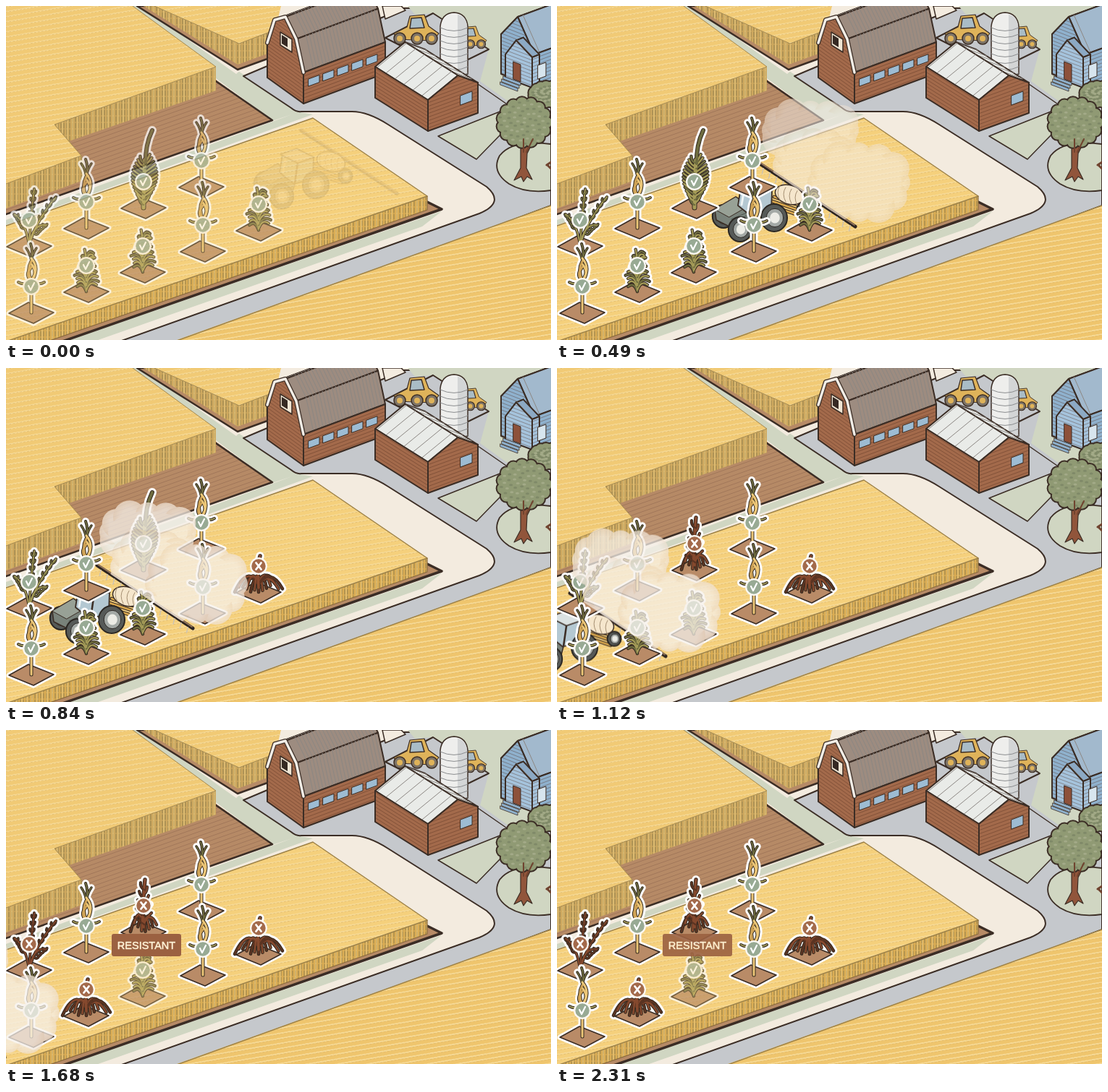
Write an HTML page with a canvas that moves like this. It is 753 by 462 pixels and loops after 2.38 s.

```html
<!DOCTYPE html>
<html lang="en">
<head>
<meta charset="utf-8">
<title>Field spraying</title>
<style>
html, body { margin: 0; width: 100%; height: 100%; overflow: hidden; background: #f3ebdf; }
canvas { display: block; }
</style>
</head>
<body>
<canvas id="stage" width="753" height="462"></canvas>
<script>
const W = 753, H = 462, STEP = 70, FRAMES = 34;
const INK = '#3b2d25', GREEN = '#d0d6c2', GRAY = '#c5c8cc', CREAM = '#f3ebdf';
const SOIL = '#b68a66', BRICK = '#a36a4b', GLASS = '#9dbcd3';
let g = document.getElementById('stage').getContext('2d');

const clamp = (v, a = 0, b = 1) => Math.min(b, Math.max(a, v));
function random(seed) {
  return () => (seed = seed * 16807 % 2147483647) / 2147483647;
}

function sprite(w, h, ox, oy, draw) {
  const c = document.createElement('canvas'), old = g;
  c.width = w; c.height = h;
  g = c.getContext('2d');
  g.translate(-ox, -oy);
  g.lineJoin = g.lineCap = 'round';
  draw();
  g = old;
  return c;
}

function paint(p, fill, line, w = 1.5) {
  if (fill) { g.fillStyle = fill; g.fill(p); }
  if (line) { g.strokeStyle = line; g.lineWidth = w; g.stroke(p); }
}
const path = (d, fill, line, w) => paint(new Path2D(d), fill, line, w);
const poly = (pts, fill, line, w) => path('M' + pts + 'Z', fill, line, w);
const line = (pts, color, w) => path('M' + pts, null, color, w);
function oval(x, y, rx, ry, fill, stroke, w, tilt = 0) {
  const p = new Path2D();
  p.ellipse(x, y, rx, ry, tilt, 0, 7);
  paint(p, fill, stroke, w);
}
const add = ([x, y], [u, v], k = 1) => [x + u * k, y + v * k];
// Parallelogram spanned by two vectors
const quad = (p, u, v) => [p, add(p, u), add(add(p, u), v), add(p, v)].join(' ');

// Polygon filled with parallel strokes; upright when slope is null
function hatch(pts, fill, color, slope, gap, w = 1, dash = []) {
  g.save();
  const p = new Path2D('M' + pts + 'Z');
  paint(p, fill);
  g.clip(p);
  g.setLineDash(dash);
  g.strokeStyle = color;
  g.lineWidth = w;
  g.beginPath();
  for (let k = -300; k < 1000; k += gap) {
    if (slope === null) { g.moveTo(k, 0); g.lineTo(k, H); }
    else { g.moveTo(0, k); g.lineTo(W, k + slope * W); }
  }
  g.stroke();
  g.restore();
}
function wheat(pts, fill = '#f1ca75') {
  hatch(pts, fill, '#f7db98', -.17, 7, 2, [3, 2]);
  hatch(pts, null, '#dcb567', -.17, 7.01, .7, [2, 3]);
}
function stalks(pts, fill = '#cfa95f') {
  hatch(pts, fill, '#8d7c4c', null, 4, 1, [7, 2]);
  hatch(pts, null, '#e7c67c', null, 7, 1.2);
}

function drawFields() {
  path('M0 0H753V462H0Z', CREAM);
  poly('172,0 186,0 330,96 402,146 424,150 0,303 0,285 368,158 290,100', GREEN);
  poly('196,0 330,84 318,94 186,0', CREAM);
  poly('0,288 368,159 395,150 0,296', CREAM);

  // Ploughed strip and the large field
  hatch('290,102 368,158 0,288 0,246 67,164', SOIL, '#a1775a', -.35, 6);
  line('290,104 368,158 0,288', INK, 2.5);
  stalks('67,164 290,84 290,117 84,188');
  stalks('0,246 104,207 115,238 0,280');
  const edge = '0,246 104,207 67,164 290,84 175,0';
  wheat('0,0 ' + edge);
  line(edge, '#a58a50', 1);

  // Field behind the barn
  poly('181,0 320,88 364,72 364,60 320,74 205,0', SOIL, INK, 2.5);
  stalks('190,0 205,0 322,52 372,32 372,62 320,81');
  wheat('205,0 380,0 372,33 322,52');
  line('205,0 322,52 372,33', '#a58a50', 1);

  // Field being sprayed
  poly('602,284 575,305 110,468 70,468', GREEN);
  poly('582,270 602,281 75,465 30,470', SOIL);
  line('582,271 602,281 75,465', INK, 3.5);
  stalks('582,263 582,282 40,470 0,470 0,462', '#dcae55');
  wheat('424,155 582,263 0,464 0,304', '#f5d07c');
  line('0,304 424,155 582,263 0,464', '#9c8148', 1.4);
  line('582,263 582,282 40,470', '#8a6a3c', 1.2);
}

function drawYard() {
  path('M328 97L550 3L753 3V276L240 470H140L654 287Q690 272 664 250L528 164Q500 146 478 146H408Q401 147 394 141Z', GRAY, INK, 2);
  wheat('753,276 753,462 236,462', '#efc56d');
  line('753,276 236,463', '#9c8148', 1.5);
  poly('520,0 546,0 552,6 524,18', CREAM, INK);
  poly('555,0 753,0 753,126 716,148 655,104 667,60 590,10 565,12', GREEN);
  poly('524,44 590,10 667,60 610,88', GRAY, INK, 2);
  line('652,108 714,151', INK);
  path('M597 180L690 143L712 160L684 177L650 212Z', GREEN, INK);
  path('M753 191Q700 184 682 207Q670 229 695 246Q718 260 753 255Z', GREEN, INK, 1.8);
}

function loader(x, y, s) {
  g.save();
  g.translate(x, y);
  g.scale(s, s);
  poly('-30,2 -12,-7 -8,-22 12,-24 18,-8 32,2 24,12 -26,10', '#dfb35a', INK, 1.2);
  poly('-6,-19 8,-20 12,-6 -8,-5', '#a9bcc6', INK);
  for (const k of [-22, 2, 22]) {
    oval(k, 9, 8, 8, '#7d7366', INK);
    oval(k, 9, 4, 4, '#dfb35a');
  }
  g.restore();
}

// Building from its near corner: a gable along `side`, swept along `depth`.
// Each profile entry is [share of side, height].
function building(corner, side, depth, profile, wall, roof, rib) {
  const top = profile.map(([t, h]) => add(add(corner, side, t), [0, -h]));
  for (let i = top.length - 2; i >= 0; i--) {
    const rise = [top[i + 1][0] - top[i][0], top[i + 1][1] - top[i][1]];
    poly(quad(top[i], rise, depth), roof, INK, 2);
    for (let k = .12; k < 1; k += rib) line([add(top[i], depth, k), add(top[i + 1], depth, k)].join(' '), '#8c8783', 1);
  }
  const face = [corner, ...top, add(corner, side)].join(' ');
  const flank = quad(corner, depth, [0, -profile[0][1]]);
  for (const [pts, v] of [[face, side], [flank, depth]]) {
    hatch(pts, wall, 'rgba(80,45,30,.4)', v[1] / v[0], 5);
    poly(pts, null, INK, 2);
  }
  return top;
}

function drawBuildings() {
  loader(566, 36, 1);
  loader(640, 46, .75);

  path('M600 28Q602 10 619 9Q636 10 638 28V94Q619 104 600 94Z', '#eeeeec', INK);
  path('M624 12Q636 14 637 28V94L624 98Z', '#d3d5d6');
  for (let y = 30; y < 95; y += 9) path(`M600 ${y}Q619 ${y + 9} 638 ${y}`, null, '#8b8d8f', 1);

  // Barn
  const gable = building([411, 135], [-50, -36], [113, -42],
    [[0, 43], [.2, 82], [.5, 102], [.8, 87], [1, 48]], BRICK, '#9d8c80', .04).join(' ');
  line(gable, INK, 6);
  line(gable, '#f2ede6', 3.5);
  poly(quad([379, 36], [16, 10], [0, 18]), '#f0e6d4', INK);
  poly(quad([381, 40], [8, 5], [0, 12]), '#352923');
  for (let i = 0; i < 5; i++) poly(quad([418 + i * 20, 101 - i * 7.2], [15, -5.5], [0, 10]), GLASS, INK, 1);

  // Shed
  building([583, 173], [69, -25], [-73, -46], [[0, 43], [.6, 62], [1, 42]], BRICK, '#e9ebe8', .17);
  poly(quad([628, 124], [16, -6], [0, 13]), GLASS, INK, 1);

  // House
  building([730, 112], [-46, -18], [60, -22], [[0, 45], [.5, 88], [1, 55]], '#8fb1cd', '#a2b9cd', 2);
  building([727, 113], [-37, -14], [10, -4], [[0, 42], [.6, 57], [1, 32]], '#a5c3dc', '#8ca9c4', 2);
  poly(quad([701, 77], [10, 4], [0, 24]), '#8d513a', INK, 1);
  poly(quad([735, 82], [11, -4], [0, 19]), '#d7e5ee', INK, 1);
  for (let i = 0; i < 3; i++) poly(quad([687 - i * 2, 97 + i * 4], [24, 9], [0, 4]), '#8fb1cd', INK, .8);
}

function crown(x, y, rx, ry) {
  const ring = 2 * Math.PI / 15;
  for (const [grow, color] of [[2, INK], [0, '#909a74']]) {
    for (let a = 0; a < 6.2; a += ring) oval(x + Math.cos(a) * rx, y + Math.sin(a) * ry, 8 + grow, 8 + grow, color);
    oval(x, y, rx + 3, ry + 3, color);
  }
  for (let i = 0; i < 60; i++) {
    const r = Math.sqrt(i / 60) * 1.15;
    oval(x + Math.cos(i * 2.4) * rx * r, y + Math.sin(i * 2.4) * ry * r, 2.5, 1.5, i % 2 ? '#7f8968' : '#a3aa88');
  }
}
function drawTrees() {
  crown(748, 122, 18, 10);
  path('M711 188L711 224L702 241L712 236L715 243L720 236L727 240L719 224L720 204L728 188Z', '#91553b', INK, 1.2);
  crown(716, 161, 30, 27);
  path('M715 184V202M719 202L728 184', null, '#70432f', 2);
  path('M747 220L753 216M748 220L753 225', null, '#70432f', 3);
}

// Plants are lists of curves [x1, y1, bend x, bend y, x2, y2, width, colour], with the badge at 0,0.
const LIVE = ['#6f6d40', '#a59c58'], DEAD = ['#5b3422', '#85492e'], TAN = ['#cfa356', '#ecc677'];

function corn() {
  const out = [[0, 36, 0, 10, 0, -10, 3, TAN[1]]];
  for (const s of [-1, 1]) {
    out.push([0, -7, s * 10, -1, s * 18, -6, 2, LIVE[1]]);
    out.push([0, -36, s * 2, -46, s * 7, -53, 1.5, LIVE[0]]);
  }
  out.push([0, -36, 3, -48, -1, -59, 2, LIVE[0]]);
  for (let i = 0; i < 4; i++) out.push([0, -8, (i % 2 ? 9 : -9) + i, -16 - i * 3, 0, -27 - i * 4, 3, TAN[i % 2]]);
  return out;
}
function spike() {
  const out = [[0, 36, 0, 0, 2, -30, 5, LIVE[1]]];
  for (let i = 0; i < 26; i++) {
    const t = i / 26, s = i % 2 ? 1 : -1, y = 32 - 62 * t;
    out.push([t * 3, y, s * 5, y - 2, t * 3 + s * 17 * Math.sin(Math.PI * (.12 + t * .8)), y - 10, 2.5, LIVE[i % 3 ? 1 : 0]]);
  }
  out.push([3, -25, 2, -50, 12, -71, 4, LIVE[0]]);
  return out;
}
function grass([dark, light]) {
  const out = [];
  for (const [x, y] of [[7, -43], [37, -32], [-20, -8], [24, 7]]) {
    out.push([0, 36, x * .2, 4, x, y, 2, light]);
    for (let k = .55; k < 1; k += .12) {
      const px = x * k * k + .4 * x * k * (1 - k), py = 36 + (y - 36) * k;
      for (const s of [-3, 3]) out.push([px, py, px + s, py, px + s + x * .05, py - 4, 1.6, dark]);
    }
  }
  return out;
}
function bush() {
  const out = [], r = random(77);
  for (let i = 0; i < 22; i++) {
    const t = i / 21, s = i % 2 ? 1 : -1, y = 36 - 46 * t, reach = s * (21 - 13 * t) * (.6 + .4 * r());
    out.push([0, y, reach * .4, y - 14, reach + 3 * t, y - 7 - 12 * t * r(), 2.4, LIVE[i % 3 ? 1 : 0]]);
  }
  return out;
}
// Withered stems: a fan that bends over, `rise` high and `reach` wide
function twigs(n, reach, rise, seed) {
  const out = [], r = random(seed);
  for (let i = 0; i < n; i++) {
    const k = 2 * i / (n - 1) - 1, end = 36 - 20 * r() * Math.abs(k);
    out.push([0, 26, k * reach * .5, -2 + 10 * r(), k * reach, end, 2.6, DEAD[i % 2]]);
  }
  out.push([0, 30, -2, 0, 2, -rise, 3.5, DEAD[1]]);
  return out;
}
function deadSpike() {
  const out = twigs(8, 18, 36, 9);
  for (let i = 0; i < 9; i++) out.push([1, 26 - i * 6, i % 2 ? 5 : -5, 22 - i * 6, (i % 2 ? 1 : -1) * (12 - i), 16 - i * 6, 2.2, DEAD[i % 2]]);
  return out;
}

function plantSprite(curves, dead) {
  return sprite(110, 150, -55, -85, () => {
    const plate = '-31,37 -4,22 31,36 3,51';
    const sweep = (grow, color) => {
      for (const [a, b, c, d, e, f, w, own] of curves) path(`M${a} ${b}Q${c} ${d} ${e} ${f}`, null, color || own, w + grow);
    };
    poly(plate, '#fff', '#fff', 7);
    sweep(8, '#fff');
    poly(plate, '#b98b67', INK, 1.6);
    sweep(2, '#33291f');
    sweep(0);
    oval(0, 0, 12, 12, '#fbf8f2');
    oval(0, 0, 9.7, 9.7, dead ? BRICK : '#98aa94');
    if (dead) path('M-3.5 -4.5L3.5 4.5M3.5 -4.5L-3.5 4.5', null, '#fff', 2.8);
    else path('M-4 -1L-1 5L4 -5', null, '#fff', 2.2);
  });
}
const art = {
  corn: plantSprite(corn()), spike: plantSprite(spike()), grass: plantSprite(grass(LIVE)), bush: plantSprite(bush()),
  deadSpike: plantSprite(deadSpike(), true), deadGrass: plantSprite(grass(DEAD), true),
  deadBush: plantSprite(twigs(13, 33, 14, 31), true)
};

// x, y, living look, withered look, step at which it withers
const plants = [
  [270, 214, 'corn'], [190, 243, 'spike', 'deadSpike', 13.5], [111, 271, 'corn'],
  [32, 296, 'grass', 'deadGrass', 21.5], [349, 274, 'bush', 'deadBush', 9],
  [272, 303, 'corn'], [189, 332, 'bush'], [111, 359, 'bush', 'deadBush', 21.5], [35, 388, 'corn']
];

function tyre(x, y, r) {
  oval(x, y, r * .95, r, '#565a58', '#2b2723', 2);
  oval(x + 1, y, r * .62, r * .67, '#a3a9a6', '#2b2723', 1);
  oval(x + 1, y, r * .36, r * .4, '#ecece6');
}
function boom() {
  line('280,218 412,305', '#2c2420', 5);
  line('281,217 411,303', '#9a7a60', 1.5);
}
function drawSprayer() {
  tyre(230, 291, 16);
  tyre(283, 270, 13);
  boom();
  for (let k = .04; k < 1; k += .07) line(quad([280 + 132 * k, 221 + 87 * k], [-2, 8], [0, 0]), '#c9c1b6', 1);
  for (let k = 0; k < 3; k++) {
    line(`${294 + k * 3},${276 - k * 6} ${336 + k * 3},${290 - k * 6}`, INK, 5);
    line(`${294 + k * 3},${276 - k * 6} ${336 + k * 3},${290 - k * 6}`, '#dba94e', 2.5);
  }
  tyre(341, 281, 10);
  oval(321, 261, 20, 13, '#f5e6cc', INK, 1.5, .3);
  for (let x = 308; x < 336; x += 8) path(`M${x} ${246 + (x - 300) * .3}q-6 9 0 20`, null, '#a58f72', 1);
  poly('218,281 247,264 274,280 268,303 240,306 220,296', '#79827a', INK);
  poly('218,281 247,264 264,277 238,292', '#98a196', INK, 1);
  for (let y = 294; y < 304; y += 4) line(`241,${y + 1} 262,${y - 8}`, '#4d554f', 1);
  poly('250,276 254,251 274,243 297,255 296,284 270,292', '#b4c8d2', INK, 1.8);
  poly('251,251 273,243 298,255 275,263', '#dbe2e2', INK);
  line('275,263 271,291', INK, 2.5);
  line('258,258 255,275', '#eef4f5', 3);
  tyre(300, 293, 19);
  tyre(253, 309, 17);
}
const sprayer = sprite(230, 140, 205, 205, drawSprayer);

function lobe(x, y, rx, ry) {
  const puff = (px, py, r) => {
    const shade = g.createRadialGradient(px, py, r * .5, px, py, r);
    shade.addColorStop(0, '#f6f0ea');
    shade.addColorStop(1, '#efe1d2');
    oval(px, py, r, r, shade);
  };
  for (let i = 0; i < 12; i++) puff(x + rx * Math.cos(i * Math.PI / 6), y + ry * Math.sin(i * Math.PI / 6), 17 + i % 3 * 3);
  oval(x, y, rx + 5, ry + 5, '#f6f0ea');
}
const cloud = sprite(250, 210, 265, 110, () => {
  g.clip(new Path2D('M265 207L280 218L412 305L515 312V110H265Z'));
  lobe(350, 172, 50, 24);
  lobe(355, 220, 40, 34);
  lobe(417, 244, 54, 38);
});

const scene = sprite(W, H, 0, 0, () => { drawFields(); drawYard(); drawBuildings(); drawTrees(); });

const label = sprite(100, 36, 144, 280, () => {
  const box = new Path2D();
  box.roundRect(146, 282, 96, 31, 3);
  paint(box, '#9b6141');
  g.font = '14.5px "Liberation Sans", Arial, sans-serif';
  g.textAlign = 'center';
  g.textBaseline = 'middle';
  g.fillStyle = g.strokeStyle = '#fff3d8';
  g.lineWidth = .5;
  g.fillText('RESISTANT', 194, 298.5);
  g.strokeText('RESISTANT', 194, 298.5);
});

// Smooth curve through [step, value] points
function follow(keys, f) {
  let i = 0;
  while (i < keys.length - 2 && f > keys[i + 1][0]) i++;
  const slope = j => {
    const a = keys[Math.max(0, j - 1)], b = keys[Math.min(keys.length - 1, j + 1)];
    return (b[1] - a[1]) / (b[0] - a[0]);
  };
  const [x0, y0] = keys[i], [x1, y1] = keys[i + 1], d = x1 - x0, u = (f - x0) / d, v = 1 - u;
  return v * v * (1 + 2 * u) * y0 + u * v * v * d * slope(i) + u * u * (3 - 2 * u) * y1 - u * u * v * d * slope(i + 1);
}
const travel = [[0, 0], [7, 128], [12, 282], [16, 390], [20, 474], [28, 605], [34, 690]];
const glow = [[0, 1], [16, 1], [20, .55], [28, .83], [34, .66]];

function put(img, x, y, alpha) {
  if (alpha <= 0) return;
  g.globalAlpha = alpha;
  g.drawImage(img, x, y);
  g.globalAlpha = 1;
}

function draw(f) {
  const d = 128 - follow(travel, f), dy = -.357 * d, fresh = clamp(.72 + f / 14);
  g.drawImage(scene, 0, 0);
  put(sprayer, 205 + d, 205 + dy, clamp(.1 + f / 6));
  for (const [x, y, look, withered, at] of plants) {
    const k = withered ? clamp((f - at) / 2) : 0;
    const resists = look === 'bush' && !withered;
    put(art[look], x - 55, y - 85, fresh * (1 - k) * (resists ? clamp(follow(glow, f)) : 1));
    if (k) put(art[withered], x - 55, y - 85, k);
  }
  put(cloud, 265 + d, 110 + dy, .75 * clamp(f / 10) * clamp((33 - f) / 9));
  put(label, 144, 280, clamp((f - 17.5) / 4) * clamp(1 - (f - 32) / 10));
}

function tick(now) {
  draw(Math.floor(now / STEP) % FRAMES);
  requestAnimationFrame(tick);
}
draw(0);
requestAnimationFrame(tick);
</script>
</body>
</html>
```
